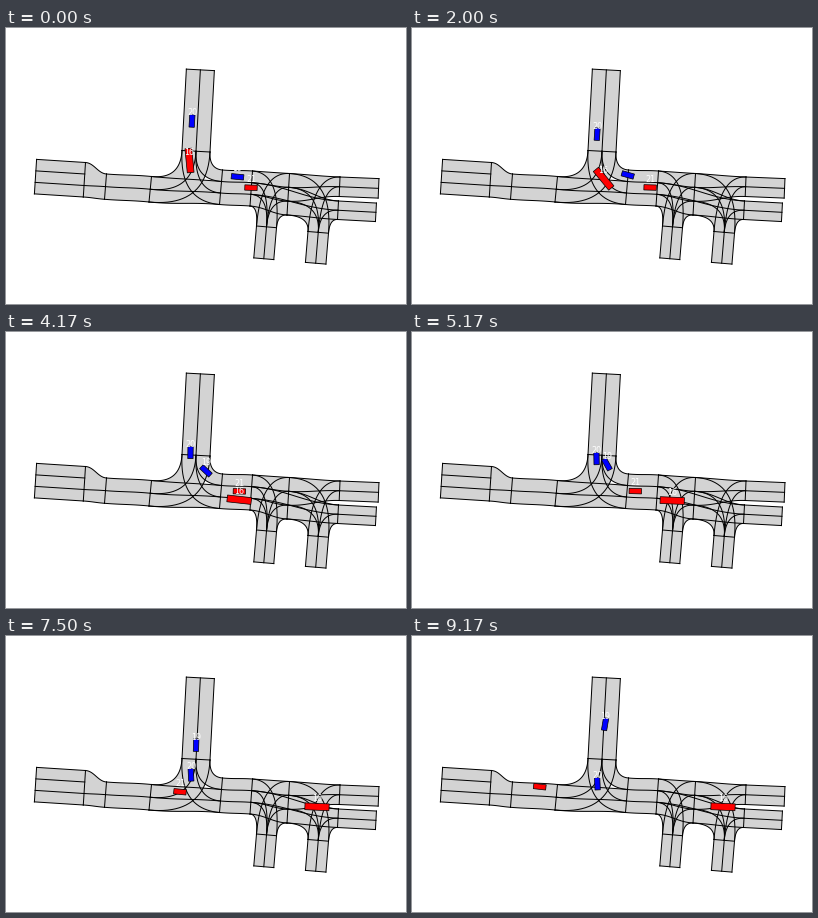
These frames come from a looping animation (400x276 px, 9.34 s). A matplotlib script:

```python
import numpy as np
import matplotlib.pyplot as plt
from matplotlib.animation import FuncAnimation
from matplotlib.patches import Polygon

W, H, DPI = 400, 276, 64
PX = 72 / DPI  # points per pixel
LOOP_MS, TICK_MS = 9340, 20
RATE, STEPS = 6, 56  # positions per second, positions per loop

# A gate is a line across a road: its two ends and its number of lanes.
GATES = {
    "west": ((79, 134), (76.8, 168.5), 3),
    "narrow": ((100, 145.5), (98, 170.8), 2),
    "tee_w": ((145, 148), (142.5, 173.5), 2),
    "tee_n": ((175.5, 122), (203.5, 123.5), 2),
    "tee_e": ((216, 141.5), (213, 176), 3),
    "cross": ((246, 142.5), (243.5, 177.5), 3),
    "mid": ((283, 145), (280.5, 186.5), 3),
    "south_a": ((250, 197.5), (270, 199.2), 2),
    "south_b": ((301.5, 203), (322, 204.7), 2),
    "east_u": ((333.5, 148.5), (332.7, 168), 2),
    "east_l": ((332, 172.5), (331, 191), 2),
}

# Straight arms leading off the map, by length.
ARMS = {"west": -49, "tee_n": 81.5, "south_a": -32, "south_b": -31,
        "east_u": 39, "east_l": 38}

# Lane borders of one gate and the borders of the other that they run to.
LINKS = [
    ("west", "narrow", "023", "012"),
    ("narrow", "tee_w", "012", "012"),
    ("tee_w", "tee_e", "012", "123"),
    ("tee_n", "tee_w", "012", "012"),
    ("tee_n", "tee_e", "01", "32"),
    ("tee_n", "tee_e", "12", "10"),
    ("tee_e", "cross", "0123", "0123"),
    ("cross", "mid", "0123", "0123"),
    ("mid", "east_u", "012", "012"),
    ("mid", "east_l", "13", "02"),
    ("cross", "east_l", "12", "01"),
    ("south_a", "cross", "01", "32"),
    ("south_a", "cross", "12", "10"),
    ("south_a", "mid", "01", "01"),
    ("south_a", "mid", "12", "23"),
    ("south_b", "mid", "01", "32"),
    ("south_b", "mid", "12", "10"),
    ("south_b", "east_u", "01", "01"),
    ("south_b", "east_l", "12", "12"),
]


def borders(name):
    a, b, lanes = GATES[name]
    return np.linspace(a, b, lanes + 1)


def normal(name):
    dx, dy = np.subtract(GATES[name][1], GATES[name][0])
    return np.array([dy, -dx]) / np.hypot(dx, dy)


def bezier(p, q, r, s):
    t = np.linspace(0, 1, 24)[:, None]
    return ((1 - t) ** 3 * p + 3 * t * (1 - t) ** 2 * q
            + 3 * t ** 2 * (1 - t) * r + t ** 3 * s)


def connect(p, n, q, m):
    """Curve that leaves p along n and reaches q along m."""
    if abs(n[0] * m[1] - n[1] * m[0]) > 0.5:
        reach, _ = np.linalg.solve(np.column_stack([n, -m]), q - p)
        corner = p + reach * n
        return bezier(p, p + (corner - p) * 2 / 3, q + (corner - q) * 2 / 3, q)
    handle = 0.4 * np.dot(q - p, n)
    return bezier(p, p + handle * n, q - handle * m, q)


def pave(ax, lines):
    area = np.vstack([lines[0], lines[-1][::-1]])
    ax.add_patch(Polygon(area, fc="lightgray", ec="none", zorder=1))
    for line in lines:
        ax.plot(*np.transpose(line), color="black", lw=PX, zorder=2)


def draw_roads(ax):
    for name, length in ARMS.items():
        near = borders(name)
        far = near + length * normal(name)
        pave(ax, list(np.stack([near, far], axis=1)))
        ax.plot(*far.T, color="black", lw=PX, zorder=2)
    for a, b, ends_a, ends_b in LINKS:
        from_a, to_b = borders(a)[[*map(int, ends_a)]], borders(b)[[*map(int, ends_b)]]
        pave(ax, [connect(p, normal(a), q, normal(b))
                  for p, q in zip(from_a, to_b)])
    for name in GATES:
        ax.plot(*borders(name).T, color="black", lw=PX, zorder=2)


def spline(s, knots, points):
    """Smooth cubic through the points, held at both ends."""
    s = np.clip(s, 0, knots[-1])
    slopes = np.gradient(points, knots, axis=0)
    i = min(np.searchsorted(knots, s, side="right") - 1, len(knots) - 2)
    span = knots[i + 1] - knots[i]
    u = (s - knots[i]) / span
    return ((1 + 2 * u) * (1 - u) ** 2 * points[i]
            + u * (1 - u) ** 2 * span * slopes[i]
            + u * u * (3 - 2 * u) * points[i + 1]
            + u * u * (u - 1) * span * slopes[i + 1])


class Vehicle:
    """Drives along a route; its speed changes evenly between the given steps."""

    def __init__(self, ax, label, color, size, route, speeds):
        self.route = np.array(route, float)
        legs = np.hypot(*np.diff(self.route, axis=0).T)
        self.knots = np.append(0, np.cumsum(legs))
        pace = np.interp(np.arange(STEPS - 1) + 0.5, list(speeds), list(speeds.values()))
        self.travel = np.append(0, np.cumsum(pace))
        self.corners = np.array([(-1, -1), (1, -1), (1, 1), (-1, 1)]) * size / 2
        self.body = ax.add_patch(Polygon(self.corners, closed=True, fc=color,
                                         ec="black", lw=0.7 * PX, zorder=3))
        self.text = ax.text(0, 0, label, color="white", fontsize=8 * PX,
                            family="DejaVu Sans", ha="center", zorder=4)

    def at(self, s):
        return spline(s, self.knots, self.route)

    def move(self, k):
        s = min(self.travel[k], self.knots[-1])
        x, y = self.at(s)
        dx, dy = self.at(s + 2) - self.at(s - 2)
        c, d = np.array([dx, dy]) / np.hypot(dx, dy)
        self.body.set_xy(self.corners @ np.array([(c, d), (-d, c)]) + (x, y))
        self.text.set_position((x, y - 5.6))


fig = plt.figure(figsize=(W / DPI, H / DPI), dpi=DPI, facecolor="white")
ax = fig.add_axes([0, 0, 1, 1])
draw_roads(ax)
ax.set(xlim=(-0.5, W - 0.5), ylim=(H - 0.5, -0.5))  # whole numbers are pixel centres
ax.axis("off")

BUS, CAR = np.array([24.2, 6.8]), np.array([12.4, 5.3])
vehicles = [
    Vehicle(ax, "16", "red", BUS,
            [(183, 132), (183.6, 137), (190.5, 149.5), (197.5, 156.5),
             (213.5, 163.5), (231, 167), (258, 168), (310.5, 170.3)],
            {0: 0.8, 25: 4.5}),
    Vehicle(ax, "19", "blue", CAR,
            [(231, 148.3), (215.5, 146.5), (199, 138), (190, 119.5),
             (189.6, 108.5), (193, 85)],
            {0: 1.3, 30: 1.4, 55: 2.3}),
    Vehicle(ax, "20", "blue", CAR,
            [(185.5, 92.5), (184, 120), (185, 150)],
            {0: 1.1, 24: 1.1, 34: 0.88}),
    Vehicle(ax, "21", "red", CAR,
            [(244.5, 159.2), (200, 157.6), (174.6, 155.4), (120, 149.4)],
            {0: 1, 12: 0.15, 20: 0.2, 44: 4.65}),
]


def update(i):
    # the traffic advances in discrete steps, not on every tick
    k = min(STEPS - 1, int((i * TICK_MS + 14) * RATE / 1000))
    for vehicle in vehicles:
        vehicle.move(k)
    return [part for v in vehicles for part in (v.body, v.text)]


anim = FuncAnimation(fig, update, frames=LOOP_MS // TICK_MS, interval=TICK_MS,
                     init_func=lambda: update(0), repeat=True, repeat_delay=0)
plt.show()
```
